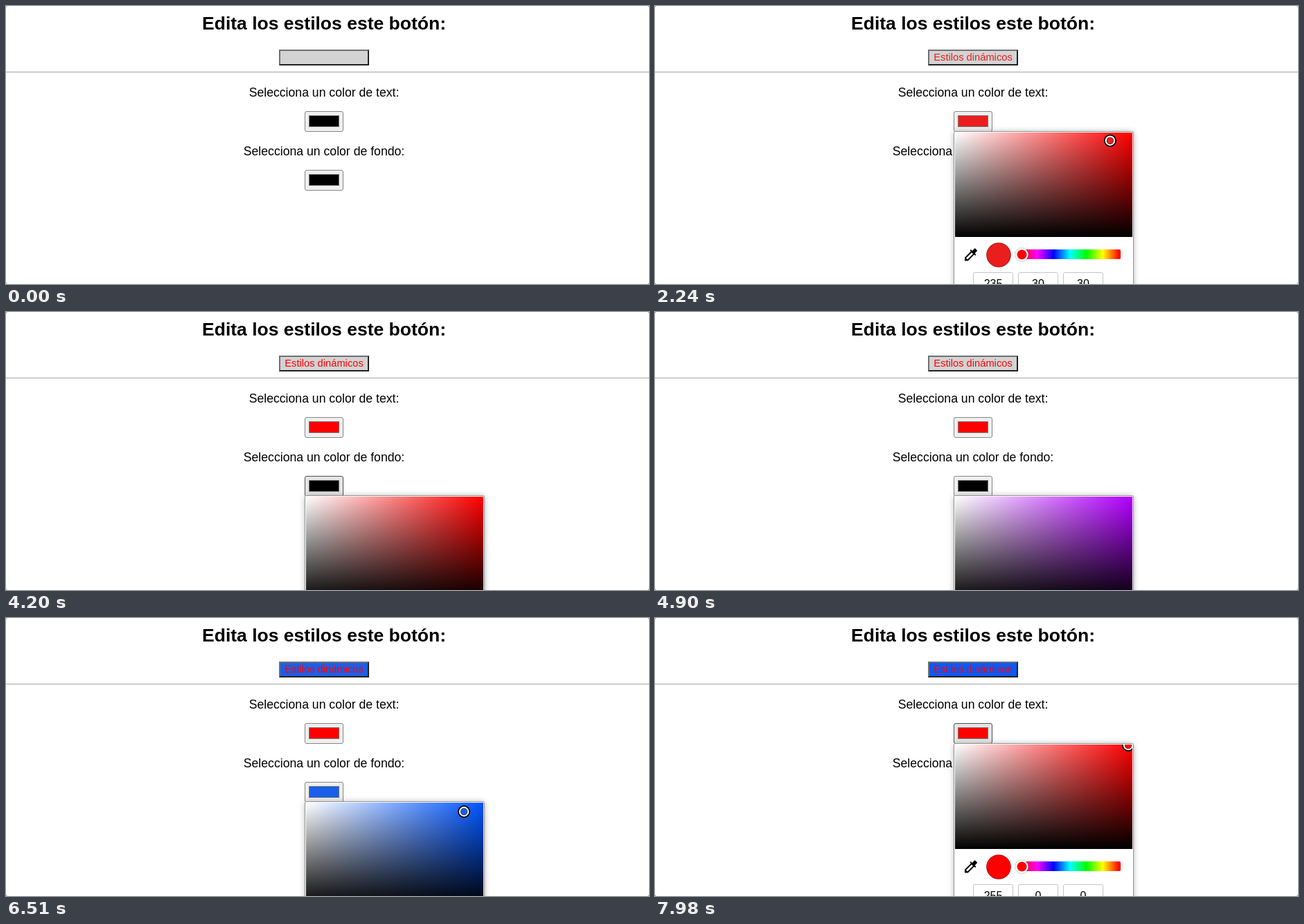
An HTML page with a canvas for the animation above (8 s loop, 928x402 px).

```html
<!DOCTYPE html>
<html lang="es">
<head>
<meta charset="utf-8">
<title>Estilos dinámicos</title>
<style>
  html, body { margin: 0; width: 100%; height: 100%; overflow: hidden; background: #fff; }
  canvas { display: block; }
</style>
</head>
<body>
<canvas id="stage" width="928" height="402"></canvas>
<script>
const g = document.getElementById('stage').getContext('2d');
const LOOP = 8000, STEP = 70;
const FONT = '"Liberation Sans", Arial, sans-serif';
const AREA = { x: 433, w: 256, h: 151 };
const dropper = new Path2D('M20.71 5.63l-2.34-2.34c-.39-.39-1.02-.39-1.41 0l-3.12 3.12-1.93-1.91-1.41 1.41 1.42 1.42L3 16.25V21h4.75l8.92-8.92 1.42 1.42 1.41-1.41-1.92-1.92 3.12-3.12c.4-.4.4-1.03.01-1.42zM6.92 19L5 17.08l8.06-8.06 1.92 1.92L6.92 19z');

// Keys: [time, ...values]. Marker positions are relative to the top of the colour area.
const textDrag = [[0, 433, 151], [1120, 433, 151], [1190, 505, 79], [1400, 541, 58], [1960, 622, 26], [2450, 683, 1]];
const backDrag = [[0, 433, 151], [5530, 433, 151], [5600, 560, 71], [6510, 661, 13], [6790, 680, 3]];
const backHue = [[4270, 360], [4340, 350], [4690, 306], [4830, 306], [4900, 282], [5180, 220]];

function at(keys, t) {
  if (t <= keys[0][0]) return keys[0].slice(1);
  for (let i = 1; i < keys.length; i++) {
    const a = keys[i - 1], b = keys[i];
    if (t < b[0]) {
      const k = (t - a[0]) / (b[0] - a[0]);
      return a.slice(1).map((v, j) => v + (b[j + 1] - v) * k);
    }
  }
  return keys[keys.length - 1].slice(1);
}

function hsv(h, s, v) {
  return [5, 3, 1].map(n => {
    const k = (n + h / 60) % 6;
    return Math.round(255 * v * (1 - s * Math.max(0, Math.min(k, 4 - k, 1))));
  });
}

const clamp = v => Math.max(0, Math.min(1, v));
const css = c => `rgb(${c})`;

// Colour under the marker; the outermost pixels snap to the edge.
function picked(h, [x, y]) {
  const s = clamp((x - AREA.x) / AREA.w), v = clamp(1 - y / AREA.h);
  return hsv(h, s > .97 ? 1 : s, v > .99 ? 1 : v);
}

function rect(x, y, w, h, color) {
  g.fillStyle = color;
  g.fillRect(x, y, w, h);
}

function box(x, y, w, h, r, fill, stroke) {
  g.beginPath();
  g.roundRect(x, y, w, h, r);
  g.fillStyle = fill;
  g.fill();
  if (stroke) {
    g.strokeStyle = stroke;
    g.lineWidth = 1;
    g.stroke();
  }
}

function disc(x, y, r, color) {
  g.beginPath();
  g.arc(x, y, r, 0, 7);
  g.fillStyle = color;
  g.fill();
}

function text(s, x, y, size, color = '#000', weight = '') {
  g.font = `${weight} ${size}px ${FONT}`;
  g.textAlign = 'center';
  g.fillStyle = color;
  g.fillText(s, x, y);
}

function button(back, color) {
  rect(394, 63, 130, 23, '#222');
  g.beginPath();
  g.moveTo(394, 86);
  g.lineTo(394, 63);
  g.lineTo(524, 63);
  g.lineTo(522, 65);
  g.lineTo(396, 84);
  g.fillStyle = '#707070';
  g.fill();
  rect(396, 65, 126, 19, back);
  if (color) text('Estilos dinámicos', 459, 79.3, 14.7, color);
}

function colorInput(y, color, hover) {
  box(431.5, y + .5, 55, 29, 2.5, hover ? '#e5e5e5' : '#efefef', hover ? '#4f4f4f' : '#858585');
  rect(437, y + 6, 44, 17, '#777');
  rect(438, y + 7, 42, 15, color);
}

function gradient(x0, y0, x1, y1, ...stops) {
  const f = g.createLinearGradient(x0, y0, x1, y1);
  stops.forEach((c, i) => f.addColorStop(i / (stops.length - 1), c));
  return f;
}

function colorArea(top, hue, [x, y], color) {
  const { x: left, w, h } = AREA;
  g.save();
  g.beginPath();
  g.rect(left, top, w, h);
  g.clip();
  rect(left, top, w, h, `hsl(${hue} 100% 50%)`);
  rect(left, top, w, h, gradient(left, 0, left + w, 0, '#fff', '#fff0'));
  rect(left, top, w, h, gradient(0, top, 0, top + h, '#0000', '#000'));
  disc(x, top + y, 9, '#000');
  disc(x, top + y, 7.2, '#fff');
  disc(x, top + y, 5.2, '#333');
  disc(x, top + y, 4.6, color);
  g.restore();
}

function controls(top, hue, rgb) {
  g.save();
  g.translate(444, top + 164.5);
  g.fillStyle = '#000';
  g.fill(dropper);
  g.restore();

  disc(496, top + 177, 17.8, css(rgb.map(c => c * .72)));
  disc(496, top + 177, 16.8, css(rgb));

  const hues = [360, 300, 240, 180, 120, 60, 0].map(h => `hsl(${h} 100% 50%)`);
  box(524, top + 169, 148, 14, 2, gradient(528, 0, 670, 0, ...hues));
  g.save();
  g.shadowColor = '#0006';
  g.shadowBlur = 3;
  disc(529.5, top + 176.5, 9.3, '#fff');
  g.restore();
  disc(529.5, top + 176.5, 7, `hsl(${hue} 100% 50%)`);

  rgb.forEach((c, i) => {
    const x = 459 + i * 65;
    box(x + .5, top + 202.5, 57, 30, 2, '#fff', '#c4c4c4');
    text(c, x + 29, top + 224, 16);
  });
}

function picker(top, hue, marker, rgb, alpha) {
  if (!alpha) return;
  g.save();
  g.globalAlpha = alpha;
  g.save();
  g.shadowColor = '#0005';
  g.shadowBlur = 10;
  g.shadowOffsetY = 1;
  box(432, top - 1.5, 258, 300, 2, '#fff');
  g.restore();
  box(431.5, top - 1.5, 259, 300, 2, '#fff', '#929292');
  colorArea(top, hue, marker, css(rgb));
  controls(top, hue, rgb);
  g.restore();
}

// Popups appear over a few steps and vanish at once.
const popup = (t, from, full, until) =>
  t < from || t >= until ? 0 : Math.min(1, (t - from + STEP) / (full - from + STEP));

function draw(now) {
  const t = Math.floor(now % LOOP / STEP) * STEP;
  const within = (a, b) => t >= a && t < b;
  const textMark = at(textDrag, t), backMark = at(backDrag, t);
  const [hue] = at(backHue, t);
  const color = picked(0, textMark), back = picked(hue, backMark);

  rect(0, 0, 928, 402, '#999');
  box(0, 0, 928, 402, 3, '#fff');
  text('Edita los estilos este botón:', 459, 34, 26.5, '#000', 'bold');
  button(t < 5600 ? '#d3d3d3' : css(back), t >= 1190 && css(color));
  rect(0, 95, 928, 1, '#a3a3a3');

  text('Selecciona un color de text:', 459, 131, 17.65);
  colorInput(152, css(color), within(140, 700) || t >= 7560);
  text('Selecciona un color de fondo:', 459, 216, 17.65);
  colorInput(237, css(back), within(3150, 4340));

  picker(183, 0, textMark, color, popup(t, 420, 490, 2870) || popup(t, 7840, 7980, LOOP));
  picker(267, hue, backMark, back, popup(t, 3780, 3850, 7210));
}

const start = performance.now();
function frame() {
  draw(performance.now() - start);
  requestAnimationFrame(frame);
}
frame();
</script>
</body>
</html>
```
